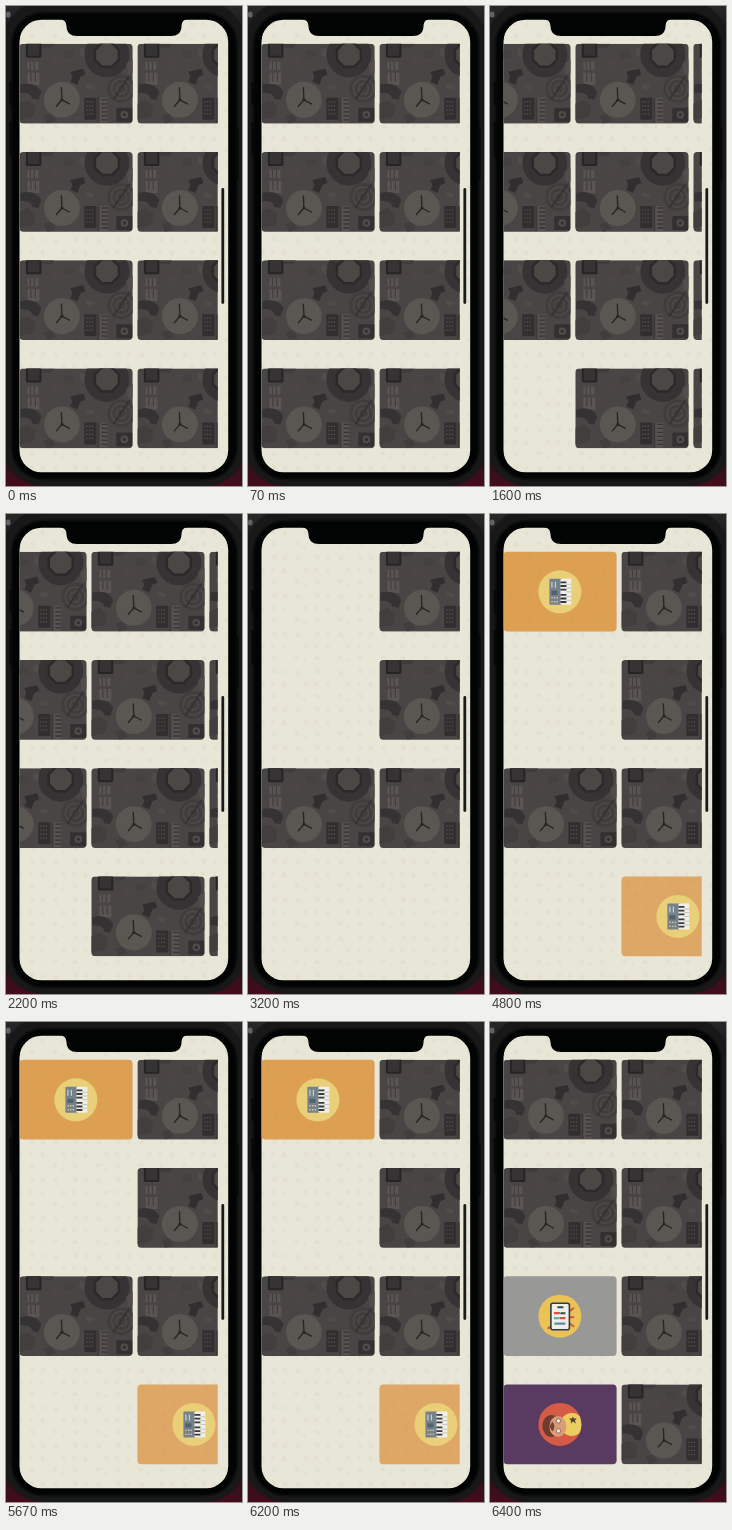
These frames come from a looping animation (236x480 px, 8 s). An HTML page:

```html
<!DOCTYPE html>
<html lang="en">
<head>
<meta charset="utf-8">
<title>Memory cards</title>
<style>
  html, body { margin: 0; width: 100%; height: 100%; overflow: hidden; background: #191819; }
  svg { display: block; width: 100%; height: 100%; }
  .scene { visibility: hidden; animation: show 8s step-end infinite; }
  @keyframes show {
    0% { visibility: visible; }
    20%, 100% { visibility: hidden; }
  }
</style>
</head>
<body>
<svg viewBox="0 0 236 480">
  <defs>
    <linearGradient id="room" x2="0" y2="1">
      <stop offset="0" stop-color="#292829"/>
      <stop offset=".06" stop-color="#181819"/>
      <stop offset=".94" stop-color="#181718"/>
      <stop offset=".97" stop-color="#36101b"/>
      <stop offset="1" stop-color="#450b1c"/>
    </linearGradient>

    <pattern id="paper" width="43" height="38" patternUnits="userSpaceOnUse">
      <g fill="#786c4a" opacity=".05">
        <path d="M4 6l3-2 3 3-3 3zM24 3h4l1 4-4 1zM13 16l4 1-1 4-4-1zM34 18l3-2 2 4-3 2zM3 28l4-1 2 3-4 2zM23 30l3-3 3 3-2 3z"/>
        <circle cx="37" cy="6" r="2"/>
        <circle cx="25" cy="18" r="2"/>
        <circle cx="14" cy="33" r="1.8"/>
      </g>
    </pattern>

    <clipPath id="cardShape"><rect width="113.2" height="79.8" rx="4"/></clipPath>
    <clipPath id="disc"><circle cx="56.5" cy="40" r="21.5"/></clipPath>
    <clipPath id="list"><rect x="13.5" y="30" width="198.2" height="430"/></clipPath>

    <g id="back" clip-path="url(#cardShape)">
      <rect width="114" height="80" fill="#484544"/>
      <!-- tablet, shelf and headphones -->
      <path d="M22 0h13l-3 4h-9z" fill="#403c3c"/>
      <rect x="6.5" y="-2" width="15.5" height="16" rx="1.5" fill="#262526"/>
      <rect x="8.5" y="0" width="11.5" height="12" fill="#353334"/>
      <path d="M8 18h11v8H8zM8 29h12v12H8z" fill="#5a5552"/>
      <path d="M11 18v8M15 18v8M11.5 29v9M16 29v9" stroke="#413e3d" stroke-width="1.2"/>
      <path d="M1 41q15-4 21 7l-3 8-6-1q-1-7-12-6z" fill="#353233"/>
      <path d="M0 60l8-4 8 6-2 11-14 3z" fill="#423e3e"/>
      <path d="M32 17l8 3M36 14v9" stroke="#5f4644" stroke-width=".7"/>
      <circle cx="36" cy="18" r="3" fill="none" stroke="#54494a" stroke-width=".6"/>
      <path d="M44 8l9-2 2 7-9 2z" fill="#444140"/>
      <path d="M51 28l13-3 2 6-5 2-3 8-7-3 2-5z" fill="#302e2f"/>
      <path d="M61 4l6 3-2 7-5-3zM68 40l7 2-2 4-7-2z" fill="#514c4a"/>
      <path d="M24 72l8-2 4 7-8 3z" fill="#413d3d"/>
      <!-- wheel -->
      <circle cx="87.5" cy="11" r="17" fill="none" stroke="#353334" stroke-width="11"/>
      <path d="M82.5-1h10l7 7v10l-7 7h-10l-7-7V6z" fill="#4a4745" stroke="#2b292a" stroke-width="2.5"/>
      <!-- record -->
      <circle cx="102" cy="45" r="14" fill="#403d3d"/>
      <g fill="none" stroke="#4e4948" stroke-width="1.6">
        <circle cx="102" cy="45" r="10"/>
        <circle cx="102" cy="45" r="5"/>
      </g>
      <path d="M94 56l16-24" stroke="#363334" stroke-width="2"/>
      <path d="M107 20l7-5v14l-5 2z" fill="#524d4b"/>
      <!-- clock -->
      <circle cx="42.5" cy="56" r="18" fill="#5a5651"/>
      <path d="M42.5 56l-.5-12M42.5 56l7.5 4M42.5 56l-5.5 6.5" fill="none" stroke="#272627" stroke-width="1.4" stroke-linecap="round"/>
      <circle cx="42.5" cy="56" r="1.6" fill="#292728"/>
      <!-- mixer, keyboard and speaker -->
      <rect x="65" y="54" width="12" height="22" rx="1" fill="#302e2f"/>
      <path d="M67 58h8M67 62h8M67 66h8M67 70h8" stroke="#5d5753" stroke-width="1.2" stroke-dasharray="1.2 1.5"/>
      <path d="M78 54h10v25H78z" fill="#575250"/>
      <path d="M82 56h6M82 60h6M82 64h6M82 68h6M82 72h6M82 76h6" stroke="#383535" stroke-width="1.3"/>
      <path d="M79 54v25" stroke="#3c3838" stroke-width="2"/>
      <rect x="97" y="64" width="16" height="14" rx="1" fill="#323031"/>
      <circle cx="105" cy="71" r="3.8" fill="#524d4a"/>
      <circle cx="105" cy="71" r="1.8" fill="#343132"/>
    </g>

    <g id="synth">
      <circle cx="56.5" cy="40" r="21.5" fill="#e8cf78"/>
      <rect x="46" y="27" width="13" height="26" rx="1" fill="#75828a"/>
      <rect x="57" y="27" width="11" height="26" rx="1" fill="#f1eee3"/>
      <path d="M57 30.5h6M57 34.2h6M57 37.9h6M57 43h6M57 46.7h6M57 50.2h6" stroke="#373b44" stroke-width="1.8"/>
      <path d="M63 32.5h5M63 36.2h5M63 40h5M63 44.8h5M63 48.5h5" stroke="#a2a4a1" stroke-width=".6"/>
      <path d="M48.5 30v6M52 30v6" stroke="#c6d0ce" stroke-width="1.2"/>
      <rect x="48" y="39" width="6" height="4" fill="#4f626d"/>
      <path d="M48 46h7M48 50h7" stroke="#e0c5a4" stroke-width="1.4" stroke-dasharray="1.4 1.2"/>
    </g>

    <g id="phone">
      <circle cx="56.5" cy="40" r="21.5" fill="#ebc255"/>
      <path d="M66 35l4-3M66 41h4M66 47l4 3M48 50l-3 2" stroke="#c9583f" stroke-width="2" stroke-linecap="round"/>
      <rect x="47.5" y="27" width="18.5" height="26.5" rx="2" fill="#f1eee5" stroke="#2d3c4a" stroke-width="1.6"/>
      <path d="M54 31h6M57 37h5" stroke="#33495b" stroke-width="2"/>
      <path d="M50.5 37h6M56 42h6" stroke="#d2543f" stroke-width="2.2"/>
      <path d="M50.5 42h5" stroke="#49a5ac" stroke-width="2"/>
      <path d="M51 47.5h11" stroke="#5f8ba8" stroke-width="2.2"/>
    </g>

    <g id="person">
      <circle cx="56.5" cy="40" r="21.5" fill="#d65b47"/>
      <g clip-path="url(#disc)">
        <circle cx="68.5" cy="40" r="11.5" fill="#ebcd60"/>
        <ellipse cx="48" cy="41.5" rx="9" ry="11" fill="#6e3c2f"/>
        <ellipse cx="54.5" cy="42" rx="8.5" ry="10.5" fill="#d99c78"/>
        <path d="M49 37q4 5 0 10l-3-5z" fill="#7a4434"/>
        <g fill="#f0e6da" stroke="#7d5142" stroke-width=".7">
          <circle cx="55" cy="36.5" r="2.2"/>
          <circle cx="55" cy="46.5" r="2.2"/>
        </g>
        <path d="M69.500 32l1 2h3l-2 2 1 3-3-2-2 2v-3l-2-2h3z" fill="#574536"/>
      </g>
    </g>
  </defs>

  <rect width="236" height="480" fill="url(#room)"/>
  <rect x="-2" y="-4" width="240" height="484" rx="38" fill="#181818"/>
  <rect x="0" y="5.500" width="4.500" height="6" rx="2" fill="#626263"/>
  <rect x="5.5" y="6.5" width="225.5" height="467" rx="32" fill="#020303" stroke="#0d0e0e" stroke-width="2"/>
  <path d="M5 76v23M5 116v35M231 121v53" stroke="#070808" stroke-width="3"/>
  <g id="screen">
    <rect x="13.5" y="13.7" width="208.7" height="452.6" rx="22" fill="#e8e6d7"/>
    <rect x="13.5" y="13.7" width="208.7" height="452.6" rx="22" fill="url(#paper)"/>
  </g>

  <g id="scenes" clip-path="url(#list)"></g>

  <path d="M53.500 13h128q-6 1-6 7 0 10-11 10H71.500q-11 0-11-10 0-6-7-7z" fill="#020303"/>
  <rect x="215.4" y="182" width="2.8" height="116" rx="1.4" fill="#1b1b1a"/>
</svg>

<script>
  const NS = "http://www.w3.org/2000/svg";
  const STEP = 1600, LOOP = 8000;
  const PITCH = 118, ROW = 108.2, TOP = 37.8;

  // One letter per card, one word per row; a dot is an empty place.
  const scenes = [
    { x: 13.4, rows: "BB BB BB BB" },
    { x: -32.7, rows: "BBB BBB BBB .BB" },
    { x: 13.4, rows: ".B .B BB .." },
    { x: 13.4, rows: "SB .B BB .T" },
    { x: 13.4, rows: "BB BB GB PB" }
  ];
  const faces = {
    S: ["synth", "#dda052"],
    T: ["synth", "#dfa766"],
    G: ["phone", "#989896"],
    P: ["person", "#593b62"]
  };

  function add(parent, tag, attrs) {
    const el = document.createElementNS(NS, tag);
    for (const key in attrs) el.setAttribute(key, attrs[key]);
    return parent.appendChild(el);
  }

  function addCard(parent, kind, x, y) {
    const card = add(parent, "g", { transform: `translate(${x} ${y})` });
    if (kind === "B") {
      add(card, "use", { href: "#back" });
      return;
    }
    const [icon, fill] = faces[kind];
    const box = { width: 113.2, height: 79.8, rx: 4 };
    add(card, "rect", { ...box, fill });
    if (icon === "synth") add(card, "rect", { ...box, fill: "url(#paper)" });
    add(card, "use", { href: "#" + icon });
  }

  const root = document.getElementById("scenes");
  scenes.forEach(({ x, rows }, i) => {
    const group = add(root, "g", { class: "scene" });
    group.style.animationDelay = `${i ? i * STEP - LOOP : 0}ms`;
    rows.split(" ").forEach((row, r) => {
      [...row].forEach((kind, c) => {
        if (kind !== ".") addCard(group, kind, x + c * PITCH, TOP + r * ROW);
      });
    });
  });
</script>
</body>
</html>
```
